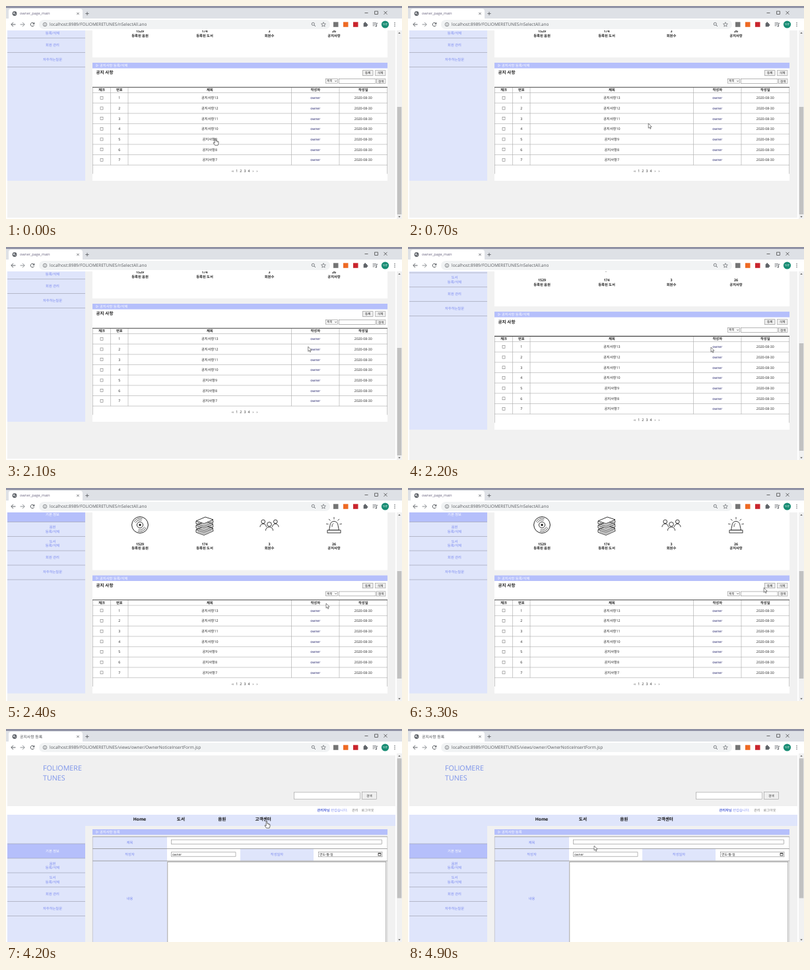
These frames come from a looping animation (600 by 323 pixels, 5000 ms). An HTML page with a canvas:

```html
<!DOCTYPE html>
<html lang="ko">
<head>
<meta charset="utf-8">
<title>공지사항</title>
<style>
html, body { margin: 0; width: 100%; height: 100%; overflow: hidden; background: #fff; }
canvas { display: block; width: 600px; height: 323px; }
</style>
</head>
<body>
<canvas id="stage"></canvas>
<script>
const W = 600, H = 323, LOOP = 5000, STEP = 100;
const canvas = document.getElementById('stage');
const ctx = canvas.getContext('2d');
const ratio = window.devicePixelRatio || 1;
canvas.width = W * ratio;
canvas.height = H * ratio;

const FONT = '"Open Sans", "Noto Sans CJK KR", "Noto Sans CJK", sans-serif';
const PALE = '#dfe5fb', BAR = '#b5bffb', GREY = '#f1f1f1', LINK = '#7b8af0', INK = '#222';
const BASE_URL = 'localhost:8989/FOLIOMERETUNES/';
const LIST_URL = BASE_URL + 'nSelectAll.ano';
const FORM_URL = BASE_URL + 'views/owner/OwnerNoticeInsertForm.jsp';
const LOAD_AT = 3900, FORM_AT = 4200, MAX_SCROLL = 46.5;

// pointer tip: time, x, y
const PATH = [
  [0, 317, 201], [200, 317, 201], [1400, 442.5, 140], [1600, 442.5, 140],
  [2200, 459, 152], [2400, 485, 175], [2700, 497, 174], [3500, 547, 147],
  [3900, 547, 147], [4100, 515, 142], [4200, 395, 140], [4300, 393, 140],
  [4800, 282, 177], [5000, 282, 177]
];

const ease = u => u * u * (3 - 2 * u);
const mix = (a, b, u) => a + (b - a) * u;

function rect(x, y, w, h, fill) {
  ctx.fillStyle = fill;
  ctx.fillRect(x, y, w, h);
}

function box(x, y, w, h, fill, edge, lw = 0.6) {
  rect(x, y, w, h, fill);
  ctx.strokeStyle = edge;
  ctx.lineWidth = lw;
  ctx.strokeRect(x, y, w, h);
}

function round(x, y, w, h, r, fill) {
  ctx.fillStyle = fill;
  ctx.beginPath();
  ctx.roundRect(x, y, w, h, r);
  ctx.fill();
}

function line(color, lw, ...pts) {
  ctx.strokeStyle = color;
  ctx.lineWidth = lw;
  ctx.beginPath();
  for (let i = 0; i < pts.length; i += 2) ctx.lineTo(pts[i], pts[i + 1]);
  ctx.stroke();
}

function arc(x, y, r, color, lw = 0.8, from = 0, to = Math.PI * 2) {
  ctx.strokeStyle = color;
  ctx.lineWidth = lw;
  ctx.beginPath();
  ctx.arc(x, y, r, from, to);
  ctx.stroke();
}

function disc(x, y, r, fill) {
  ctx.fillStyle = fill;
  ctx.beginPath();
  ctx.arc(x, y, r, 0, Math.PI * 2);
  ctx.fill();
}

function shape(fill, edge, lw, ...pts) {
  ctx.beginPath();
  for (let i = 0; i < pts.length; i += 2) ctx.lineTo(pts[i], pts[i + 1]);
  ctx.closePath();
  ctx.fillStyle = fill;
  ctx.fill();
  if (edge) {
    ctx.strokeStyle = edge;
    ctx.lineWidth = lw;
    ctx.stroke();
  }
}

// y is the vertical middle of the line
function text(str, x, y, size = 5.3, color = INK, align = 'center', weight = 400) {
  ctx.font = `${weight} ${size}px ${FONT}`;
  ctx.fillStyle = color;
  ctx.textAlign = align;
  ctx.fillText(str, x, y + size * 0.36);
}

function button(str, x, y, w, h, edge = '#999', fill = '#efefef', size = 4.6) {
  box(x, y, w, h, fill, edge);
  text(str, x + w / 2, y + h / 2, size);
}

function cross(x, y, r, color, lw = 0.8) {
  line(color, lw, x - r, y - r, x + r, y + r);
  line(color, lw, x + r, y - r, x - r, y + r);
}

function globe(x, y) {
  disc(x, y, 3.4, '#5f6368');
  shape('#dfe1e5', null, 0, x - 2.4, y - 1, x, y - 2.2, x + 0.4, y, x - 1, y + 1.2);
  shape('#dfe1e5', null, 0, x + 0.8, y + 0.4, x + 2.4, y, x + 1, y + 2.2);
}

function chrome(t) {
  const loading = t >= LOAD_AT && t < FORM_AT;
  const dark = '#5f6368';
  rect(0, 0, W, 20, '#dee1e6');
  rect(0, 0, W, 3, '#8f91a4');
  round(4, 4, 112, 18, [4, 4, 0, 0], '#fff');
  rect(0, 19, W, 18, '#fff');

  if (loading) {
    const a = t / 1000 * Math.PI * 2;
    arc(13, 11.5, 3, '#9aa0a6', 0.9, a, a + 3.6);
  } else globe(13, 11.5);
  ctx.save();
  ctx.beginPath();
  ctx.rect(20, 4, 78, 14);
  ctx.clip();
  if (t >= FORM_AT) text('공지사항 등록', 21, 11.5, 5.9, '#484b50', 'left');
  else if (loading) text(BASE_URL, 21, 11.5, 5.4, '#484b50', 'left');
  else text('owner_page_main', 21, 11.5, 5.4, '#67627e', 'left');
  ctx.restore();
  cross(109, 11.5, 1.7, dark);
  line(dark, 0.9, 120.4, 11.5, 125.6, 11.5);
  line(dark, 0.9, 123, 8.9, 123, 14.1);
  line('#333', 0.7, 543.5, 10.5, 548.5, 10.5);
  ctx.strokeRect(558.7, 8, 4.6, 4.6);
  cross(575, 10.3, 2.5, '#333', 0.7);

  line(dark, 1, 14.5, 28, 7.8, 28);
  line(dark, 1, 11, 24.8, 7.8, 28, 11, 31.2);
  line('#8b8f94', 1, 21.5, 28, 28.2, 28);
  line('#8b8f94', 1, 25, 24.8, 28.2, 28, 25, 31.2);
  if (loading) cross(40, 28, 2.6, dark, 1);
  else {
    arc(40, 28, 2.8, dark, 1, 0.4, 5.5);
    shape(dark, null, 0, 43.3, 24.5, 43.3, 27.8, 40, 27.8);
  }
  round(50, 21, 441, 14, 7, '#f1f3f4');
  arc(59, 28, 2.8, dark, 0.7);
  line(dark, 0.8, 59, 27.5, 59, 29.7);
  disc(59, 26.4, 0.45, dark);
  text(t >= LOAD_AT ? FORM_URL : LIST_URL, 66, 28, 6.5, '#55585d', 'left');
  arc(465.3, 27.3, 2.1, dark);
  line(dark, 0.9, 466.9, 28.9, 469, 31);
  const star = [];
  for (let i = 0; i < 10; i++) {
    const a = i * Math.PI / 5 - Math.PI / 2, r = i % 2 ? 1.6 : 3.6;
    star.push(481 + r * Math.cos(a), 28.2 + r * Math.sin(a));
  }
  shape('#f1f3f4', dark, 0.7, ...star);
  rect(496, 24.3, 7.5, 7.5, '#747474');
  rect(511, 24.3, 7.5, 7.5, '#ee6a24');
  rect(526, 24.3, 7.5, 7.5, '#c9252d');
  rect(541.7, 26, 5.2, 5.4, dark);
  disc(544.2, 25.6, 1.3, dark);
  disc(547.1, 28.7, 1.3, dark);
  for (let i = 0; i < 3; i++) line(dark, 0.8, 555.6, 25.6 + i * 2.1, i < 2 ? 561 : 558.5, 25.6 + i * 2.1);
  line(dark, 0.8, 561.6, 30.5, 561.6, 26.2, 563.4, 26.2);
  disc(560.7, 30.5, 1.1, dark);
  disc(574.5, 28, 5.6, '#158b72');
  text('다온', 574.5, 28, 4, '#fff');
  for (let i = -1; i < 2; i++) disc(589, 28 + i * 2.4, 0.75, dark);
}

function scrollbar(y, h) {
  rect(590, 37, 2, 286, '#fff');
  rect(592, 37, 8, 286, '#f1f1f1');
  rect(592.7, y, 6.6, h, '#c1c1c1');
  shape('#555', null, 0, 594.3, 41.8, 596, 39.8, 597.7, 41.8);
  shape('#555', null, 0, 594.3, 318.7, 596, 320.7, 597.7, 318.7);
}

// y is the top of the highlighted entry
function sidebar(y, bottom) {
  rect(2, 37, 118, bottom - 37, PALE);
  rect(2, y, 118, 22, BAR);
  text('기본 정보', 70.5, y + 11, 5.3, '#fff');
  ['음원', '도서'].forEach((s, i) => {
    text(s, 70.5, y + 30 + i * 21.3, 5.3, LINK);
    text('등록/삭제', 70.5, y + 36.5 + i * 21.3, 5.3, LINK);
  });
  text('회원 관리', 70.5, y + 76, 5.3, LINK);
  text('자주하는질문', 70.5, y + 98, 5.3, LINK);
  [0, 22, 44, 65.6, 87.5, 109.5].forEach(d => line('#a2a5b5', 0.7, 2, y + d, 120, y + d));
}

function titleBar(str, y) {
  rect(131, y, 447, 8.5, BAR);
  shape('transparent', '#fff', 0.5, 136.8, y + 2.4, 139.8, y + 4.2, 136.8, y + 6);
  text(str, 142, y + 4.2, 5.3, '#fff', 'left');
}

function recordIcon(x, y) {
  arc(x, y, 12.4, INK, 1);
  [10, 7.5].forEach(r => {
    arc(x, y, r, INK, 0.7, -2.7, -1.2);
    arc(x, y, r, INK, 0.7, 0.4, 1.9);
  });
  arc(x, y, 4.6, INK, 0.9);
  disc(x, y, 1.8, INK);
}

function booksIcon(x, y) {
  for (let i = 2; i >= 0; i--) {
    const d = y - 6 + i * 6.6;
    shape('#fff', INK, 0.9, x - 13, d, x + 1, d - 6, x + 13, d - 2, x - 1, d + 4);
    line(INK, 0.9, x - 13, d, x - 13, d + 4, x - 1, d + 8.3, x + 13, d + 2, x + 12, d - 1.5);
    line(INK, 0.6, x - 11, d + 2.6, x - 1, d + 6.2, x + 11, d + 0.6);
  }
}

function person(x, y, k) {
  arc(x, y, 3.3 * k, INK, 0.9);
  arc(x, y + 9.6 * k, 5.6 * k, INK, 0.9, Math.PI, 0);
}

function peopleIcon(x, y) {
  person(x - 9.3, y - 5, 0.85);
  person(x + 9.3, y - 5, 0.85);
  person(x, y - 1, 1);
}

function sirenIcon(x, y) {
  arc(x, y + 0.5, 6, INK, 0.9, Math.PI, 0);
  line(INK, 0.9, x - 6, y + 0.5, x - 7.5, y + 8, x + 7.5, y + 8, x + 6, y + 0.5);
  box(x - 10, y + 8, 20, 4, '#fff', INK, 0.9);
  line(INK, 0.8, x - 3, y + 3, x - 2.7, y - 0.5, x - 0.8, y - 2.5);
  for (let i = -2; i < 3; i++) {
    const a = i * 0.72 - Math.PI / 2, c = Math.cos(a), s = Math.sin(a);
    line(INK, 0.8, x + c * 8.5, y + s * 8.5, x + c * 12, y + s * 12);
  }
}

const STATS = [
  ['1529', '등록된 음원', recordIcon], ['174', '등록된 도서', booksIcon],
  ['3', '회원수', peopleIcon], ['26', '공지사항', sirenIcon]
];

function notices() {
  const edges = [131.5, 158.5, 185, 432.5, 505, 577.5];
  const mid = i => (edges[i] + edges[i + 1]) / 2;
  const top = 178, pitch = 15.67, end = top + pitch * 7;
  ['체크', '번호', '제목', '작성자', '작성일'].forEach((s, i) => text(s, mid(i), 174, 5.3, INK, 'center', 700));
  for (let r = 0; r < 7; r++) {
    const y = top + pitch * (r + 0.5);
    box(mid(0) - 2, y - 2, 4, 4, '#fff', '#777', 0.6);
    text(r + 1, mid(1), y);
    text('공지사항' + (13 - r - (r > 3 ? 0 : 0)), mid(2), y);
    text('owner', mid(3), y, 5.1, '#23236b');
    text('2020-08-30', mid(4), y, 5.2);
  }
  for (let r = 0; r < 8; r++) line('#a9a9a9', 0.6, 131, top + pitch * r, 578, top + pitch * r);
  edges.forEach((x, i) => line('#a9a9a9', 0.6, x, 170, x, i % 5 ? end : 301));
  line('#444', 1.1, 131, 169.8, 578, 169.8);
  ['‹‹', '1', '2', '3', '4', '›', '›'].forEach((s, i) => text(s, 343.5 + i * 6.15, 296.8));
}

function listPage(t, scroll) {
  ctx.save();
  ctx.translate(0, -scroll);
  rect(2, 0, 588, 367.5, GREY);
  sidebar(29.5, 311.5);
  rect(131, 0, 447, 124.5, '#fff');
  STATS.forEach(([num, label, icon], i) => {
    const x = 203 + i * 98;
    icon(x, 56);
    text(num, x, 85, 5.3, INK, 'center', 700);
    text(label, x, 91.5, 5.3, INK, 'center', 700);
  });
  rect(131, 132.5, 447, 179, '#fff');
  titleBar('공지사항 등록/삭제', 132.5);
  text('공지 사항', 136.5, 147.6, 6.6, INK, 'left', 700);
  const pressed = t >= 3600;
  button('등록', 540.5, 144.2, 15.5, 7.6, pressed ? '#444' : '#888', pressed ? '#dcdcdc' : '#efefef');
  button('삭제', 559.5, 144.2, 15.5, 7.6);
  box(484.3, 157, 18.4, 6.6, '#fff', '#888');
  text('제목', 486, 160.3, 4.5, INK, 'left');
  line(INK, 0.7, 498.3, 159.6, 499.7, 161, 501.1, 159.6);
  box(504.5, 157, 55.5, 6.8, '#fff', '#888');
  button('검색', 561.3, 156.8, 13.7, 7.2);
  notices();
  ctx.restore();
  scrollbar(126 + 27 * scroll / MAX_SCROLL, 163);
}

function formPage() {
  rect(2, 40, 588, 77, '#f0f0f0');
  rect(2, 147, 588, 176, GREY);
  sidebar(174, H);
  rect(2, 37, 118, 93, '#fff');
  rect(2, 40, 118, 77, '#f0f0f0');
  rect(2, 130, 588, 17, PALE);
  text('FOLIOMERE', 56, 59, 10.7, '#7b93ea', 'left');
  text('TUNES', 56, 74, 10.7, '#7b93ea', 'left');
  box(436.5, 96, 100, 10.2, '#fff', '#999');
  button('검색', 539.5, 95.6, 21.8, 11);
  text('관리자님', 471.5, 123.6, 5.2, '#4f62d8', 'left', 700);
  text('반갑습니다.', 492.5, 123.6, 5.2, LINK, 'left');
  text('관리', 524, 123.6, 5.2, '#777', 'left');
  text('로그아웃', 538.5, 123.6, 5.2, '#777', 'left');
  ['Home', '도서', '음원', '고객센터'].forEach((s, i) => text(s, 202.5 + i * 62.4, 136.3, 6.6, '#111', 'center', 700));
  titleBar('공지사항 등록', 152);

  rect(131, 163, 447, 160, '#fff');
  rect(131, 163, 113, 160, PALE);
  rect(355, 181.5, 111, 18.5, PALE);
  text('제목', 187.5, 172, 5.3, LINK);
  text('작성자', 187.5, 190.5, 5.3, LINK);
  text('작성일자', 410.5, 190.5, 5.3, LINK);
  text('내용', 187.5, 257.5, 5.3, LINK);
  [163.3, 181.5, 200].forEach(y => line('#8e8e8e', 0.8, 131, y, 578, y));
  [131.3, 577.7].forEach(x => line('#b5b5b5', 0.6, x, 163, x, H));
  box(250.3, 168, 319.2, 6.4, '#fff', '#888');
  box(250.3, 186.8, 97.7, 6.4, '#fff', '#888');
  text('owner', 252, 190, 4.8, INK, 'left');
  box(473.5, 186.3, 96.5, 7.5, '#fff', '#888');
  text('연도-월-일', 475, 190, 4.8, INK, 'left');
  box(564, 188.2, 4, 3.8, '#fff', '#222', 0.7);
  rect(564, 188, 4, 1.2, '#222');
  box(244.8, 201.5, 331, 130, '#fff', '#8a8a8a', 0.8);
  scrollbar(44.5, 212);
}

function pointerAt(t) {
  let i = 0;
  while (i < PATH.length - 2 && t >= PATH[i + 1][0]) i++;
  const [t0, x0, y0] = PATH[i], [t1, x1, y1] = PATH[i + 1];
  const u = ease((t - t0) / (t1 - t0));
  return [mix(x0, x1, u), mix(y0, y1, u)];
}

function pointer(t) {
  const [x, y] = pointerAt(t);
  const overLink = t < FORM_AT ? x < 322 : x > 376 && x < 404 && y < 142;
  ctx.save();
  ctx.translate(x, y);
  ctx.lineJoin = 'round';
  if (overLink) {
    shape('#fff', '#333', 0.7, -0.8, 0.4, 0, -0.2, 0.8, 0.4, 0.9, 3.4, 2.3, 3.5, 3.8, 4, 5, 4.8,
      5, 7.4, 4.1, 10.2, -0.4, 10.2, -2.8, 6.8, -2.4, 5.8, -0.8, 6.8);
    line('#333', 0.4, 2.2, 3.8, 2.2, 5.6);
    line('#333', 0.4, 3.6, 4.2, 3.6, 5.8);
  } else {
    shape('#fff', '#333', 0.6, 0, 0, 0, 7.2, 1.6, 5.7, 2.8, 8.3, 3.9, 7.8, 2.8, 5.3, 5, 5.2);
  }
  ctx.restore();
}

function draw(t) {
  ctx.setTransform(ratio, 0, 0, ratio, 0, 0);
  ctx.textRendering = 'geometricPrecision';
  rect(0, 0, W, H, '#fff');
  // smooth wheel scroll, 300 ms long
  const u = Math.min(1, Math.max(0, (t - 2100) / 300));
  if (t < FORM_AT) listPage(t, MAX_SCROLL * (1 - ease(u)));
  else formPage();
  chrome(t);
  pointer(t);
}

const start = performance.now();
function tick() {
  const t = (performance.now() - start) % LOOP;
  draw(t < 200 ? 0 : Math.floor(t / STEP) * STEP);
  requestAnimationFrame(tick);
}
tick();
</script>
</body>
</html>
```
